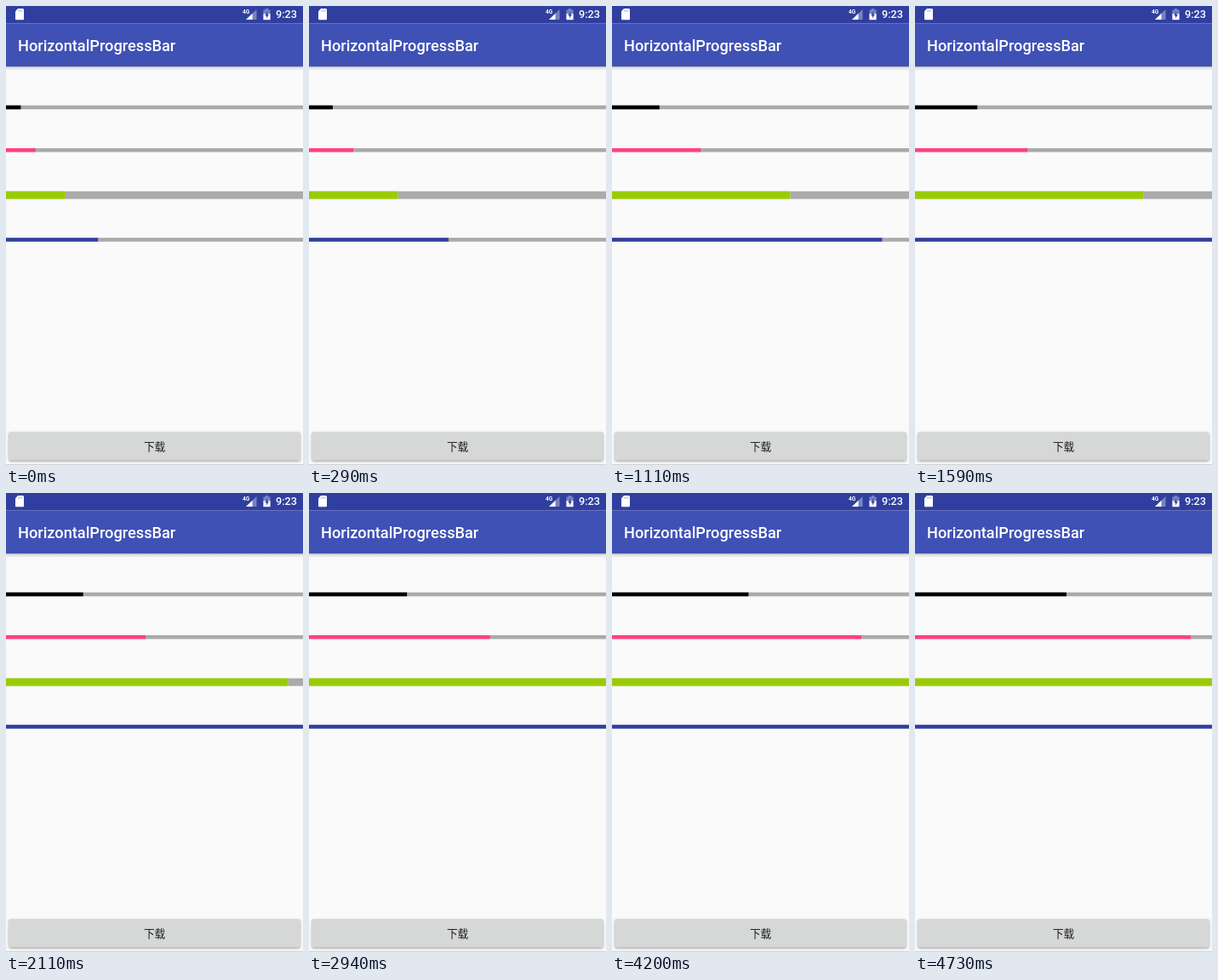
An HTML page with a canvas that plays this animation: 349 by 539 pixels, repeating every 4830 ms.

```html
<!DOCTYPE html>
<html lang="zh-CN">
<head>
<meta charset="utf-8">
<title>HorizontalProgressBar</title>
<style>
  html, body { margin: 0; width: 100%; height: 100%; overflow: hidden; background: #fafafa; }
  canvas { display: block; }
</style>
</head>
<body>
<canvas id="stage" width="349" height="539"></canvas>
<script>
const ctx = document.getElementById('stage').getContext('2d');
const W = 349, H = 539, LOOP = 4830;

// Runs of evenly spaced repaints: first time, last time, count
const runs = [
  [60, 580, 10], [640, 1110, 9], [1180, 1650, 9], [1710, 2230, 10], [2290, 2760, 9],
  [2830, 3300, 8], [3360, 3840, 8], [3900, 4380, 9], [4430, 4730, 5]
];
const ticks = [0];
for (const [from, to, count] of runs)
  for (let i = 0; i < count; i++)
    ticks.push(Math.round((from + (to - from) * i / (count - 1)) / 10) * 10);

// start: percent at time 0, step: milliseconds per percent
const bars = [
  { y: 116.7, h: 4.6, color: '#000000', start: 5.86, step: 104 },
  { y: 167, h: 4.5, color: '#ff4081', start: 10.85, step: 57 },
  { y: 217.6, h: 9, color: '#99cc00', start: 20.55, step: 28.1 },
  { y: 272.2, h: 4.5, color: '#303f9f', start: 31.7, step: 18.5 }
];

function rect(x, y, w, h, color) {
  ctx.fillStyle = color;
  ctx.fillRect(x, y, w, h);
}

function poly(color, ...pts) {
  ctx.fillStyle = color;
  ctx.beginPath();
  for (let i = 0; i < pts.length; i += 2) ctx.lineTo(pts[i], pts[i + 1]);
  ctx.closePath();
  ctx.fill();
}

function text(str, x, y, font, color, align = 'left') {
  ctx.font = font;
  ctx.fillStyle = color;
  ctx.textAlign = align;
  ctx.fillText(str, x, y);
}

function drawStatusBar() {
  const blue = '#303f9f', dim = 'rgba(255,255,255,0.35)';
  rect(0, 0, W, 20.6, blue);

  // memory card
  poly('#fff', 14, 3, 20, 3, 21, 4, 21, 15.2, 20, 16.2, 12, 16.2, 11, 15.2, 11, 6.2);
  for (let i = 0; i < 3; i++) rect(14.3 + i * 2, 4.4, 0.9, 2.3, 'rgba(48,63,159,0.45)');

  // signal strength
  poly(dim, 294.5, 4, 294.5, 16, 282, 16);
  poly('#fff', 289.5, 8.8, 289.5, 16, 282, 16);
  text('4G', 278, 9, '700 6.5px Roboto, sans-serif', '#fff');

  // charging battery
  rect(304.8, 3, 3.4, 1.6, dim);
  rect(302.4, 4.5, 8.2, 4.6, dim);
  rect(302.4, 9.1, 8.2, 7.1, '#fff');
  poly(blue, 307.2, 6.2, 304.2, 11.2, 306.1, 11.2, 306.1, 14.6, 309, 9.7, 307.2, 9.7);

  text('9:23', 342, 14.4, '500 12.7px Roboto, sans-serif', '#fff', 'right');
}

function drawToolbar() {
  const shade = ctx.createLinearGradient(0, 71, 0, 76);
  shade.addColorStop(0, 'rgba(0,0,0,0.27)');
  shade.addColorStop(0.4, 'rgba(0,0,0,0.09)');
  shade.addColorStop(1, 'rgba(0,0,0,0)');
  rect(0, 71, W, 5, shade);
  rect(0, 20.6, W, 50.4, '#3f51b5');
  text('HorizontalProgressBar', 14, 53.3, '500 18.2px Roboto, sans-serif', '#fff');
}

function drawButton() {
  ctx.save();
  ctx.shadowColor = 'rgba(0,0,0,0.35)';
  ctx.shadowBlur = 3;
  ctx.shadowOffsetY = 1.3;
  ctx.fillStyle = '#d6d7d7';
  ctx.beginPath();
  ctx.roundRect(3.4, 500.3, 342.2, 33.2, 2);
  ctx.fill();
  ctx.restore();
  text('下载', 174.6, 521.7, '500 12.7px "Noto Sans CJK SC", "Noto Sans CJK", sans-serif',
    'rgba(0,0,0,0.87)', 'center');
  rect(0, 538, W, 1, '#d2d2d2');
}

function drawBar(bar, time) {
  const percent = Math.min(100, Math.floor(bar.start + time / bar.step));
  const x = W * percent / 100;
  rect(0, bar.y, W, bar.h, '#aaaaaa');
  rect(0, bar.y, x, bar.h, '#fafafa');
  rect(0, bar.y, x, bar.h, bar.color);
}

function draw(now) {
  const t = now % LOOP;
  const time = ticks.findLast(tick => tick <= t);
  rect(0, 0, W, H, '#fafafa');
  drawStatusBar();
  drawToolbar();
  for (const bar of bars) drawBar(bar, time);
  drawButton();
}

const begin = performance.now();
function loop() {
  draw(performance.now() - begin);
  requestAnimationFrame(loop);
}
loop();
</script>
</body>
</html>
```
